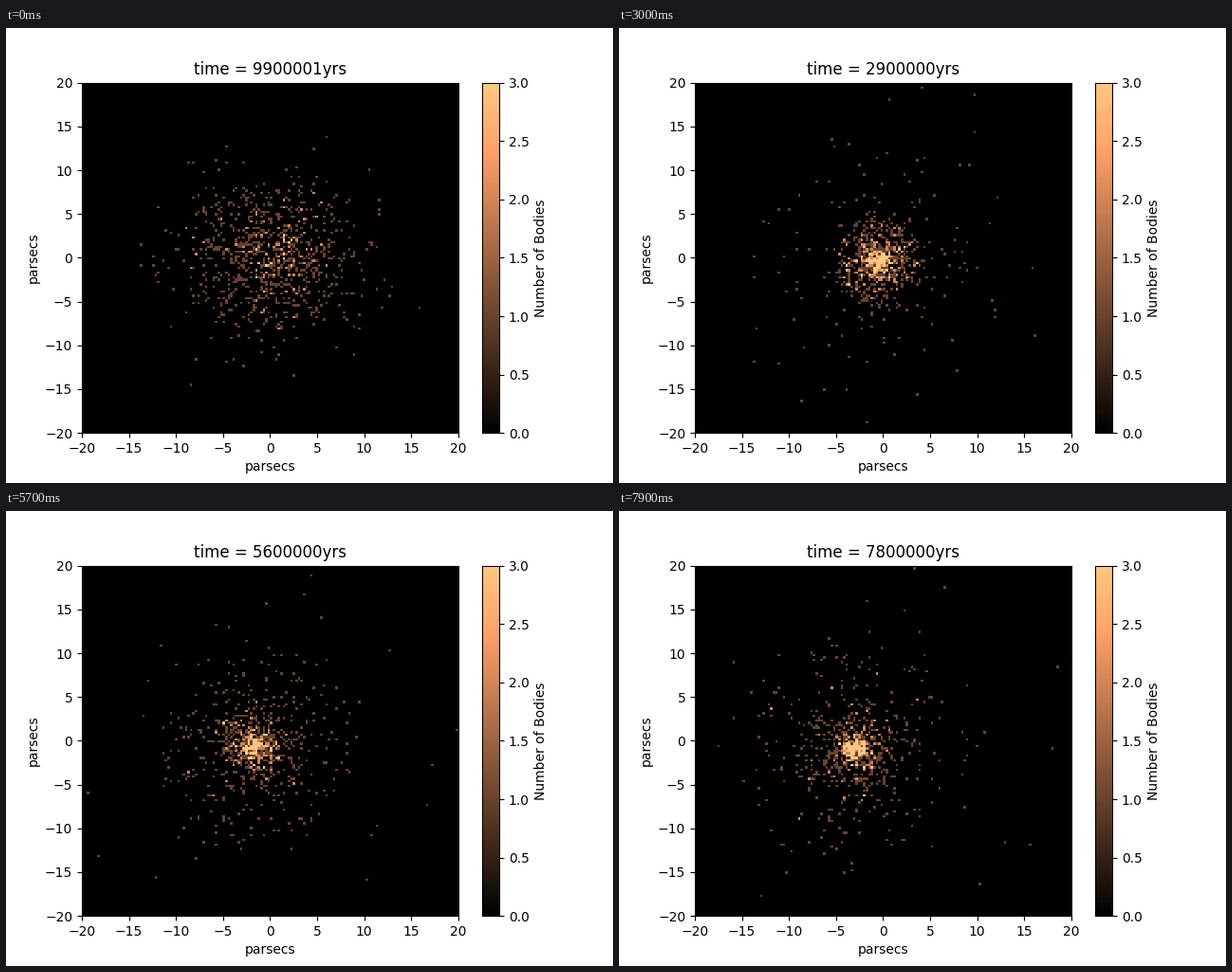
Recreate the animation shown at these times as a matplotlib script. Size 640 by 480 pixels, loop 8000 ms.

```python
import matplotlib.pyplot as plt
import numpy as np
from matplotlib.animation import FuncAnimation

FRAMES = 80
BODIES = 880
BINS = 150
EXTENT = 20
SUBSTEPS = 4
SOFT = 0.7
MASS = 1.7
CORE_MASS = 0.5

# Path of the cluster centre: frame, x, y
PATH = np.array([
    (0, 0, 0), (19, -1.1, -0.4), (30, -0.4, -0.4), (40, -1.7, -0.2),
    (51, -0.9, -0.9), (63, -2.3, -0.5), (79, -3.0, -1.0),
])


def pull(pos, t):
    """Attraction by the mass inside each body's radius and a growing core."""
    r = np.linalg.norm(pos, axis=1)
    inside = np.empty(BODIES)
    inside[np.argsort(r)] = np.arange(BODIES) / BODIES
    mass = MASS * inside + CORE_MASS * min(t / 19, 1)
    return -pos * (mass / (r**2 + SOFT**2) ** 1.5)[:, None]


def simulate():
    rng = np.random.default_rng(11)
    pos = rng.normal(0, 4.4, (BODIES, 3))
    vel = rng.normal(0, 0.13, (BODIES, 3))
    vel[rng.random(BODIES) < 0.1] *= 2.6
    vel[np.linalg.norm(pos, axis=1) < 4.5] *= 0.55
    dt = 1 / SUBSTEPS
    track = [pos.copy()]
    for step in range((FRAMES - 1) * SUBSTEPS):
        vel += pull(pos, step * dt) * dt
        pos += vel * dt
        if (step + 1) % SUBSTEPS == 0:
            track.append(pos.copy())
    return np.array(track)


def density(i):
    cx, cy = (np.interp(i, PATH[:, 0], PATH[:, k]) for k in (1, 2))
    x, y = track[i, :, 0] + cx, track[i, :, 1] + cy
    span = (-EXTENT, EXTENT)
    return np.histogram2d(y, x, bins=BINS, range=(span, span))[0]


def label(i):
    years = (i - 1) * 100000 if i else 9900001
    return f"time = {years}yrs"


track = simulate()

fig, ax = plt.subplots(figsize=(6.4, 4.8), dpi=100)
image = ax.imshow(density(0), cmap="copper", vmin=0, vmax=3, origin="lower",
                  extent=(-EXTENT, EXTENT, -EXTENT, EXTENT),
                  aspect="auto", interpolation="nearest")
fig.colorbar(image, ax=ax, label="Number of Bodies")
ticks = np.arange(-EXTENT, EXTENT + 1, 5)
ax.set(xlabel="parsecs", ylabel="parsecs", xticks=ticks, yticks=ticks)
title = ax.set_title(label(0))


def update(i):
    image.set_data(density(i))
    title.set_text(label(i))
    return image, title


anim = FuncAnimation(fig, update, frames=FRAMES, interval=100,
                     repeat=True, repeat_delay=0)
plt.show()
```
